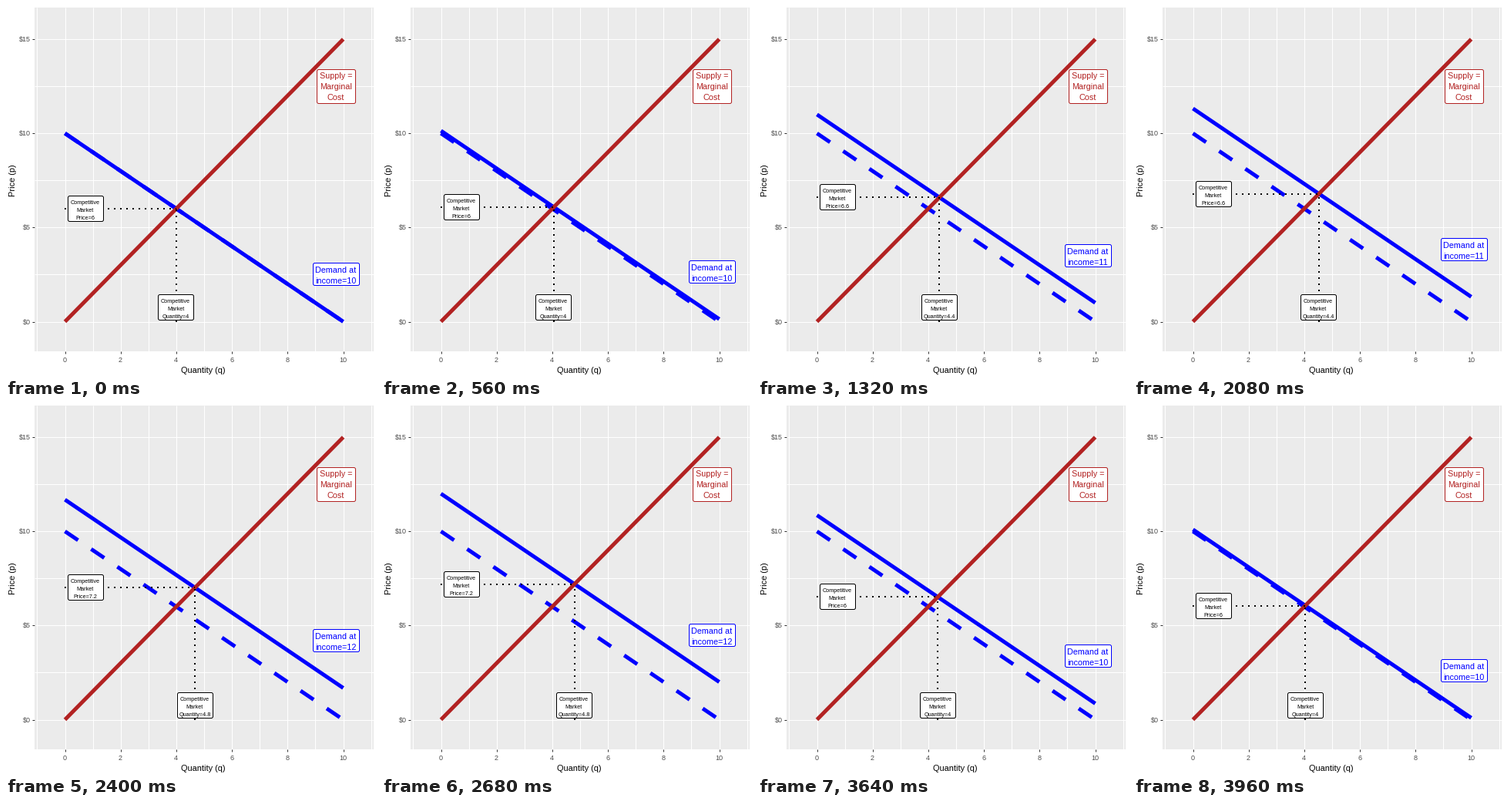
Write a matplotlib script that moves like this. It is 480 px wide and 480 px high and loops after 4000 ms.

```python
import numpy as np
import matplotlib.pyplot as plt
from matplotlib.animation import FuncAnimation
from matplotlib.patches import FancyBboxPatch, Rectangle

SIZE, DPI = 480, 72          # at 72 dpi one point is one pixel
FRAMES, INTERVAL = 100, 40
BLUE, RED, GREY = "#0000FF", "#B22222", "#4D4D4D"
LEFT, RIGHT, TOP, BOTTOM = 37, 477, 2, 448

plt.rcParams["font.family"] = "Liberation Sans"
plt.rcParams["toolbar"] = "None"

fig = plt.figure(figsize=(SIZE / DPI, SIZE / DPI), dpi=DPI, facecolor="white")
ax = fig.add_axes([0, 0, 1, 1])
ax.set_xlim(0, SIZE)
ax.set_ylim(SIZE, 0)
ax.axis("off")


def px(q):
    return 76.5 + 36.1 * q


def py(p):
    return 409.5 - 24.43 * p


def stroke(xs, ys, color, width, z, dash=None):
    style = "-" if dash is None else (0, dash)
    line, = ax.plot(xs, ys, color=color, lw=width, ls=style, zorder=z,
                    solid_capstyle="butt", dash_capstyle="butt")
    return line


def write(x, y, text, size, color, ha="center", rotation=0, z=1):
    return ax.text(x, y, text, fontsize=size, color=color, ha=ha,
                   va="baseline", rotation=rotation,
                   rotation_mode="anchor", zorder=z)


class Label:
    """Rounded white box with centred lines of text."""

    def __init__(self, width, height, color, size, baselines):
        self.width, self.height, self.baselines = width, height, baselines
        self.box = FancyBboxPatch(
            (0, 0), width, height, boxstyle="round,pad=0,rounding_size=2.2",
            fc="white", ec=color, lw=1, zorder=6)
        ax.add_patch(self.box)
        self.lines = [write(0, 0, "", size, color, z=7) for _ in baselines]

    def place(self, x, y, text):
        left = np.floor(x - self.width / 2) + 0.5
        top = np.floor(y - self.height / 2) + 0.5
        self.box.set_x(left)
        self.box.set_y(top)
        middle = round(y)
        for line, part, dy in zip(self.lines, text.split("\n"), self.baselines):
            line.set_position((left + self.width / 2 - 0.5, middle + dy))
            line.set_text(part)


# Panel, grid, ticks and axis titles
ax.add_patch(Rectangle((LEFT, TOP), RIGHT - LEFT, BOTTOM - TOP,
                       fc="#EBEBEB", ec="none", zorder=0))
for q in range(-1, 12):
    stroke([px(q)] * 2, [TOP, BOTTOM], "white", 1, 1)
for p in np.arange(0, 16, 2.5):
    stroke([LEFT, RIGHT], [py(p)] * 2, "white", 1, 1)
for q in range(0, 11, 2):
    stroke([px(q)] * 2, [BOTTOM, BOTTOM + 3], "#333333", 1, 1)
    write(px(q) - 0.5, 462, str(q), 9, GREY)
for p in range(0, 16, 5):
    stroke([LEFT - 3, LEFT], [py(p)] * 2, "#333333", 1, 1)
    write(31.5, round(py(p)) + 3, f"${p}", 9, GREY, ha="right")
write(255.5, 476, "Quantity (q)", 11, "black")
write(12, 226, "Price (p)", 11, "black", rotation=90)

# Curves
ends = np.array([0, 10])
stroke(px(ends), py(10 - ends), BLUE, 5, 2, dash=(4.1, 4.1))
demand = stroke(px(ends), py(10 - ends), BLUE, 5, 3)
stroke(px(ends), py(1.5 * ends), RED, 5, 4)
price_line = stroke([], [], "black", 2, 5, dash=(1, 3))
quantity_line = stroke([], [], "black", 2, 5, dash=(1, 3))

# Labels
supply_label = Label(50, 44, RED, 10.8, (-10, 4, 18))
supply_label.place(px(9.75), py(12.5), "Supply =\nMarginal\nCost")
demand_label = Label(60, 29, BLUE, 10.8, (-2, 12))
price_label = Label(46, 33, "black", 7.3, (-6, 4, 14))
quantity_label = Label(46, 33, "black", 7.3, (-6, 4, 14))


def income_at(frame):
    return np.interp(frame, [0, 11, 33, 45, 67, 79, 100],
                     [10, 10, 11, 11, 12, 12, 10])


def income_shown(frame):
    """The written value switches halfway through each move."""
    if 22 <= frame < 56:
        return 11
    return 12 if 56 <= frame < 90 else 10


def update(frame):
    income, shown = income_at(frame), income_shown(frame)
    x, y = px(0.4 * income), py(0.6 * income)
    demand.set_ydata(py(income - ends))
    price_line.set_data([76, x], [round(y)] * 2)
    quantity_line.set_data([round(x)] * 2, [410, y])
    demand_label.place(px(9.75), py(income - 7.5),
                       f"Demand at\nincome={shown}")
    price_label.place(px(0.75), y,
                      f"Competitive\nMarket\nPrice={0.6 * shown:g}")
    quantity_label.place(x, py(0.75),
                         f"Competitive\nMarket\nQuantity={0.4 * shown:g}")
    return []


anim = FuncAnimation(fig, update, frames=FRAMES, interval=INTERVAL,
                     init_func=lambda: update(0), repeat=True,
                     repeat_delay=0, blit=False)
plt.show()
```
